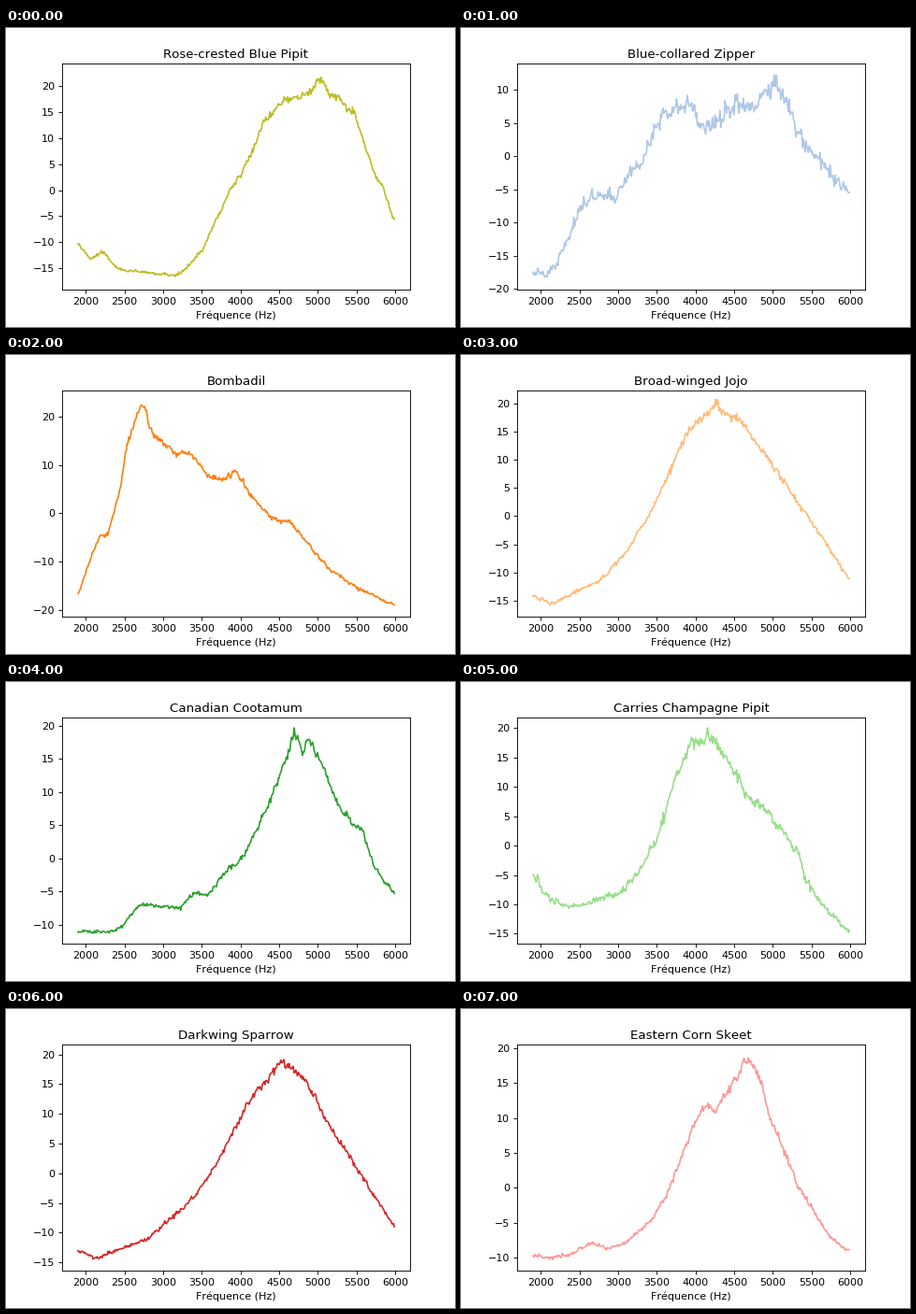
A matplotlib script that plays this animation: 480x320 px, repeating every 8 s.

```python
import numpy as np
import matplotlib.pyplot as plt
from matplotlib.animation import FuncAnimation
from matplotlib.ticker import MultipleLocator

plt.rcParams["font.family"] = "DejaVu Sans"
plt.rcParams["text.kerning_factor"] = 6

FREQ = np.linspace(1900, 5988, 380)


def smooth(values, width):
    """Running mean that keeps the ends in place."""
    padded = np.pad(values, width // 2, mode="edge")
    return np.convolve(padded, np.ones(width) / width, mode="valid")


def spectrum(seed, noise, *points):
    """Polyline through a few (kHz, dB) points, with slow wobble and fine jitter."""
    khz, db = zip(*points)
    level = smooth(np.interp(FREQ / 1000, khz, db), 5)
    rng = np.random.default_rng(seed)
    wobble = smooth(rng.normal(0, 1, FREQ.size), 5)
    jitter = rng.normal(0, 0.7, FREQ.size)
    loudness = (level - level.min()) / np.ptp(level)
    return level + noise * (wobble + jitter) * (0.5 + 0.8 * loudness)


# name, colour, dB limits, tick step, levels
birds = [
    ("Rose-crested Blue Pipit", "#bcbd22", (-19.07, 24.23), 5, spectrum(
        1, 0.4, (1.9, -10.3), (2.06, -13.2), (2.22, -11.7), (2.42, -15.2),
        (3.14, -16.4), (3.26, -15.5), (3.5, -11.6), (3.87, 0), (4.06, 4.5),
        (4.3, 13.2), (4.54, 17), (4.9, 19), (5.03, 21.8), (5.16, 18),
        (5.29, 17.8), (5.47, 14.8), (5.74, 2.8), (5.83, 1), (5.988, -6))),
    ("Blue-collared Zipper", "#aec7e8", (-20.14, 13.92), 5, spectrum(
        2, 0.8, (1.9, -17.5), (2.07, -18), (2.2, -16.2), (2.62, -5.7),
        (3, -6.2), (3.15, -2), (3.32, -1), (3.45, 3.8), (3.6, 6.5),
        (3.89, 8.2), (4.08, 4.6), (4.25, 4.6), (4.5, 8), (4.78, 8),
        (5.03, 11.4), (5.3, 4.5), (5.5, 0.5), (5.988, -5.5))),
    ("Bombadil", "#ff7f0e", (-21.35, 25.33), 10, spectrum(
        3, 0.4, (1.9, -17), (2.08, -8.5), (2.2, -4.5), (2.27, -5),
        (2.44, 4.3), (2.53, 14.5), (2.7, 22), (2.77, 22), (2.82, 17.5),
        (3.15, 12.2), (3.37, 12.2), (3.6, 7.5), (3.8, 6.7), (3.93, 9),
        (4.14, 3.5), (4.43, -1.2), (4.65, -2), (5.11, -11),
        (5.5, -15.3), (5.988, -19))),
    ("Broad-winged Jojo", "#ffbb78", (-17.8, 22.2), 5, spectrum(
        4, 0.4, (1.9, -14), (2.15, -15.5), (2.8, -11), (3.1, -6.5), (3.4, 0),
        (3.9, 15), (4.25, 19.5), (4.6, 16.5), (5.1, 7), (5.988, -11))),
    ("Canadian Cootamum", "#2ca02c", (-12.81, 21.14), 5, spectrum(
        5, 0.35, (1.9, -11), (2.32, -11), (2.5, -10), (2.7, -6.8),
        (3.2, -7.5), (3.43, -5), (3.56, -5.7), (3.87, -1.1), (3.95, -1.1),
        (4.2, 3.8), (4.48, 11.5), (4.705, 18.8), (4.815, 15.5),
        (4.87, 18.2), (5.06, 14.3), (5.2, 9.7), (5.36, 6.4),
        (5.59, 3.8), (5.74, -1.5), (5.988, -5.3))),
    ("Carries Champagne Pipit", "#98df8a", (-16.696, 21.754), 5, spectrum(
        6, 0.65, (1.9, -5), (2.08, -8.8), (2.36, -10.5), (2.56, -9.9),
        (3, -8.1), (3.28, -4.3), (3.5, 1), (3.65, 8), (3.96, 17.4),
        (4.14, 18.3), (4.27, 18), (4.4, 15), (4.71, 7.6), (4.84, 7.1),
        (5.1, 3), (5.33, -1.3), (5.43, -5.8), (5.65, -10.3), (5.988, -14.7))),
    ("Darkwing Sparrow", "#d62728", (-16.4, 21.6), 5, spectrum(
        7, 0.4, (1.9, -13), (2.15, -14.2), (2.8, -11), (3.4, -4), (3.7, 2),
        (4.2, 14), (4.55, 19), (4.85, 15.5), (5.1, 9), (5.988, -9))),
    ("Eastern Corn Skeet", "#ff9896", (-11.87, 20.48), 5, spectrum(
        8, 0.35, (1.9, -9.5), (2.05, -10.1), (2.4, -9.5), (2.65, -8),
        (2.85, -8.7), (3.08, -8), (3.4, -5), (3.64, -1), (3.85, 5.5),
        (4.11, 12), (4.25, 11.3), (4.56, 16), (4.62, 18.5), (4.72, 18),
        (4.85, 15.2), (4.96, 10), (5.2, 4), (5.33, 0.3), (5.7, -6.5),
        (5.988, -9.3))),
]

fig, ax = plt.subplots(figsize=(6, 4), dpi=80)
fig.subplots_adjust(left=0.125, right=0.9, bottom=0.125, top=0.88)
ax.set_xlim(1696, 6192)
ax.set_xlabel("Fréquence (Hz)")
ax.xaxis.set_major_locator(MultipleLocator(500))
line, = ax.plot([], [], lw=1.5)


def draw(i):
    name, color, ylim, step, level = birds[i]
    line.set_data(FREQ, level)
    line.set_color(color)
    ax.set_ylim(ylim)
    ax.yaxis.set_major_locator(MultipleLocator(step))
    ax.set_title(name)
    return line,


anim = FuncAnimation(fig, draw, frames=len(birds), init_func=lambda: draw(0),
                     interval=1000, repeat=True, repeat_delay=0)
plt.show()
```
